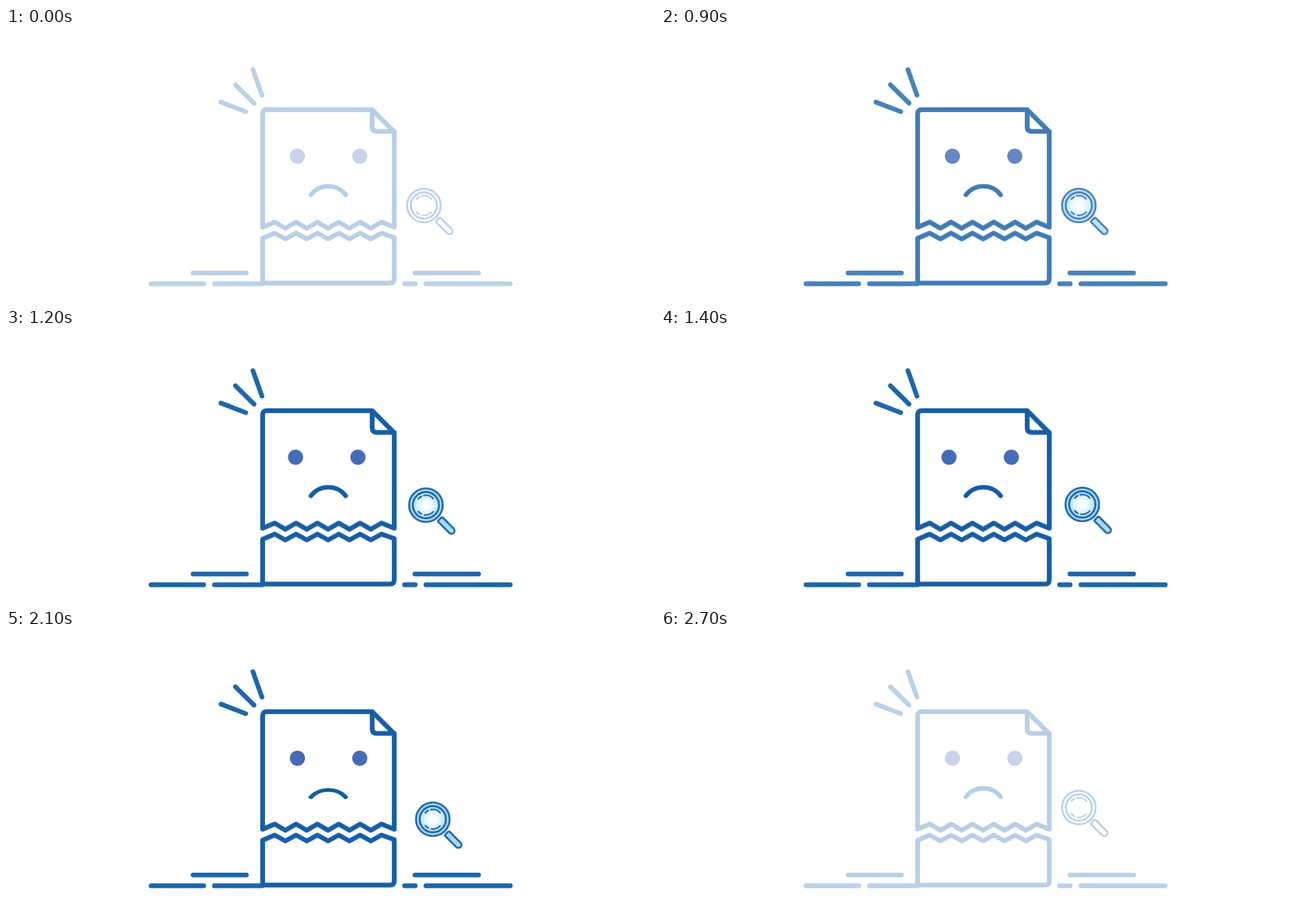
Animation of 942x396 px, one loop 3.7 s. Source, as an HTML page with a canvas:

```html
<!DOCTYPE html>
<html lang="en">
<head>
<meta charset="utf-8">
<title>Torn page</title>
<style>
html, body { margin: 0; width: 100%; height: 100%; overflow: hidden; background: #fff; }
canvas { display: block; width: 100%; height: 100%; }
</style>
</head>
<body>
<canvas id="stage" width="942" height="396"></canvas>
<script>
const ctx = document.getElementById('stage').getContext('2d');
const LOOP = 3700;

const LINE = [31, 102, 170], CORE = [23, 91, 160], EYE = [70, 107, 183];
const RIM = [38, 106, 178], GLASS = [166, 220, 241], SHINE = [246, 254, 255];

const REST = { ink: 1, fill: 1, eye: 0, glass: [0, 0], mouth: 1 };
const FAINT = { ink: 0.3, fill: 0 };

// Each pose holds until the next one starts.
const POSES = [
  [0, FAINT],
  [800, { ink: 0.62, fill: 0.45 }],
  [900, { ink: 0.82, fill: 0.75 }],
  [1000, {}],
  [1200, { eye: -2.7, glass: [3, -2] }],
  [1300, { eye: -5, glass: [5, -3] }],
  [1500, { eye: -2.7, glass: [3, -2] }],
  [1700, {}],
  [1900, { glass: [18, 6] }],
  [2100, { glass: [13, 17], mouth: 0.84 }],
  [2300, { glass: [0, 13], mouth: 0.7 }],
  [2500, {}],
  [2700, FAINT]
];

function poseAt(t) {
  let pose = POSES[0][1];
  for (const [start, p] of POSES) if (t >= start) pose = p;
  return { ...REST, ...pose };
}

// Blending towards white keeps overlapping strokes even.
function tint(rgb, amount) {
  return 'rgb(' + rgb.map(c => Math.round(255 + (c - 255) * amount)).join(',') + ')';
}

function stroke(path, rgb, width, ink) {
  ctx.strokeStyle = tint(rgb, ink);
  ctx.lineWidth = width;
  ctx.stroke(path);
}

function disc(x, y, r, fill) {
  ctx.fillStyle = fill;
  ctx.beginPath();
  ctx.arc(x, y, r, 0, Math.PI * 2);
  ctx.fill();
}

// Torn edge from left to right, alternating peaks and valleys.
function tear(peak, valley) {
  let d = '';
  for (let i = 0; i < 11; i++) {
    d += ` L${390 + i * 15.5} ${i % 2 ? valley : peak}`;
  }
  return d;
}

const page = new Path2D(
  'M563.5 289 V150.5 L531.5 118.5 H378.5 Q372.5 118.5 372.5 124.5 V289' + tear(281.5, 290.5) + ' L563.5 289' +
  ' M531.5 118.5 V143 Q531.5 150 538.5 150 H563.5' +
  ' M372.5 305' + tear(297.5, 306) + ' L563.5 304 V364 Q563.5 370 557.5 370 H372.5 Z');

const marks = new Path2D(
  'M210.5 371 H287 M302.5 371 H372 M271.5 355.3 H349' +
  ' M593.5 355.3 H686 M578.5 371 H594 M609.5 371 H732' +
  ' M312 107.5 L348 121.3 M333 82.3 L360 109 M358.4 60.4 L371.5 97.3');

const mouthArc = new Path2D('M442.5 242 C455.5 225.3 480.5 225.3 493 242');

// The mouth flattens down onto its lower edge.
function drawMouth(squash, ink) {
  ctx.save();
  ctx.translate(0, 245);
  ctx.scale(1, squash);
  ctx.translate(0, -245);
  stroke(mouthArc, LINE, 6.6, ink);
  stroke(mouthArc, CORE, 4, ink);
  ctx.restore();
}

function ring(r, from, to, width, ink) {
  const path = new Path2D();
  path.arc(0, 0, r, from * Math.PI / 180, to * Math.PI / 180);
  stroke(path, RIM, width, ink);
}

function drawGlass([dx, dy], ink, fill) {
  ctx.save();
  ctx.translate(606.5 + dx, 257.5 + dy);

  disc(0, 0, 24.5, tint(GLASS, fill));
  const lens = ctx.createRadialGradient(0, 0, 6, 0, 0, 19);
  lens.addColorStop(0, tint(SHINE, fill));
  lens.addColorStop(1, tint(GLASS, fill * 0.85));
  disc(0, 0, 19, lens);

  ring(24.4, 0, 360, 2.9, ink);
  ring(19, 0, 360, 2.9, ink);
  for (const [from, to] of [[-140, -118], [-102, -42], [42, 98], [117, 140]]) {
    ring(14.3, from, to, 2.4, ink);
  }

  ctx.rotate(Math.PI / 4);
  const handle = new Path2D();
  handle.roundRect(28.5, -4.5, 28.5, 9, [2, 4.5, 4.5, 2]);
  ctx.fillStyle = tint(GLASS, fill);
  ctx.fill(handle);
  stroke(handle, RIM, 2.9, ink);
  ctx.restore();
}

function draw(t) {
  const { ink, fill, eye, glass, mouth } = poseAt(t);
  ctx.fillStyle = '#fff';
  ctx.fillRect(0, 0, 942, 396);
  ctx.lineCap = ctx.lineJoin = 'round';

  stroke(marks, LINE, 6.8, ink);
  stroke(page, LINE, 7, ink);
  stroke(page, CORE, 3, ink);
  for (const x of [423, 513.5]) disc(x + eye, 186, 11, tint(EYE, ink));
  drawMouth(mouth, ink);
  drawGlass(glass, ink, fill);
}

const begin = performance.now();
function tick() {
  draw((performance.now() - begin) % LOOP);
  requestAnimationFrame(tick);
}
tick();
</script>
</body>
</html>
```
